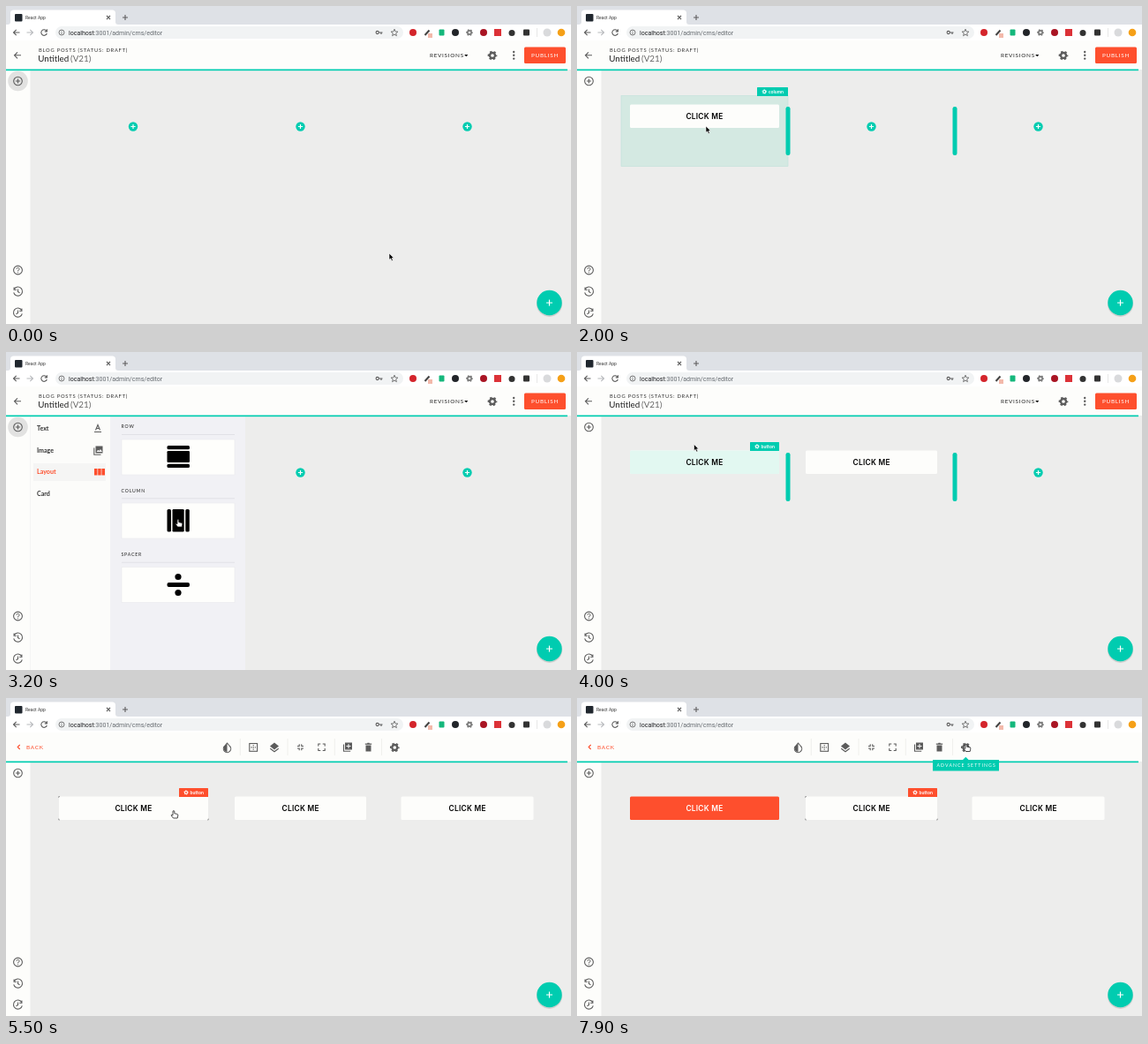
An HTML page for the animation above (8 s loop, 640 by 360 pixels).

```html
<!DOCTYPE html>
<html lang="en">
<head>
<meta charset="utf-8">
<title>Page editor</title>
<style>
  html, body { margin: 0; width: 100%; height: 100%; overflow: hidden; background: #ededec; }
  svg { display: block; width: 100vw; height: 100vh; font-family: Lato, sans-serif; }
  .teal { fill: #00ccb0; }
  .orange { fill: #fe4f2d; }
  .paper { fill: #fdfdfb; }
  .ink { fill: #5c5c5c; }
  .line { fill: none; stroke: #5c5c5c; stroke-width: 1.1; }
  .white { fill: none; stroke: #fff; }
  .zone { fill: none; stroke: #00ccb0; stroke-width: 2.5; stroke-linecap: round; }
  .chrome { font-family: Roboto, sans-serif; }
  .caps { font-size: 6.4px; letter-spacing: .7px; }
  .menu { font-size: 7.1px; font-weight: 700; fill: #333; }
  .head { font-size: 5.2px; letter-spacing: .8px; fill: #222; }
  .tag { font-size: 5.2px; font-weight: 700; fill: #fff; }
  .cta { font: 600 8.4px Inter, sans-serif; letter-spacing: .25px; text-anchor: middle; }
  .label { font-size: 7.7px; fill: #747474; }
  .help { font-size: 6.2px; fill: #858585; }
</style>
</head>
<body>
<svg viewBox="0 0 640 360">
  <defs>
    <g id="gear" fill="none" stroke="currentColor">
      <circle r="3" stroke-width="2.3"/>
      <circle r="4.5" stroke-width="1.7" stroke-dasharray="2.356" stroke-dashoffset="1.2"/>
    </g>
    <g id="add"><circle r="5.2"/><path class="white" d="M-2.6 0H2.6M0-2.6V2.6" stroke-width="1.2"/></g>
    <path id="undo" class="line" d="M-4.2-2.6A5 5 0 1 1-4.8 1.3M-4.4-4.6V-1.8H-1.6M0-2.4V.4L2 1.8"/>
    <g id="tag">
      <rect width="33" height="10" rx=".6"/>
      <use href="#gear" transform="translate(8 5) scale(.5)" color="#fff"/>
      <text class="tag" x="12.5" y="6.9">button</text>
    </g>
    <path id="corners" fill="none" stroke="#666" stroke-width=".6" stroke-dasharray="1 1"/>
  </defs>

  <!-- browser -->
  <g class="chrome">
    <rect width="640" height="22" fill="#dee1e6"/>
    <rect y="21" width="640" height="19" fill="#fff"/>
    <path d="M2 21Q5 21 5 18V8Q5 4.500 9 4.500H120Q124 4.500 124 8V18Q124 21 127 21Z" fill="#fff"/>
    <rect x="10" y="9" width="8.500" height="8.500" rx="1" fill="#20272e"/>
    <text x="22" y="14.800" font-size="5" fill="#333">React App</text>
    <path class="line" d="M114 11L118 15M118 11L114 15M132 13H138M135 10V16" stroke-width=".9"/>
    <path class="line" d="M15.500 30H8.500M11.700 26.800L8.500 30L11.700 33.200"/>
    <path class="line" d="M23.500 30H30.500M27.300 26.800L30.500 30L27.300 33.200" style="stroke:#b8babd"/>
    <path class="line" d="M45.700 28A3.300 3.300 0 1 0 46.300 31M46.400 26.300V28.900H43.800"/>
    <rect x="56" y="23" width="394" height="14" rx="7" fill="#f1f3f4"/>
    <circle class="line" cx="63" cy="30" r="3" stroke-width=".8" style="stroke-width:.8"/>
    <path class="line" d="M63 28.200V28.900M63 29.600V31.800" style="stroke-width:.8"/>
    <text x="71" y="32.600" font-size="7.050" fill="#666b70"><tspan fill="#202124">localhost</tspan>:3001/admin/cms/editor</text>
    <g class="line"><circle cx="420.700" cy="30" r="1.600"/><path d="M422.300 30H426.500M425 30V32"/></g>
    <path class="line" d="M440 26.200L441.100 28.900L443.900 29.100L441.700 30.900L442.400 33.700L440 32.200L437.600 33.700L438.300 30.900L436.100 29.100L438.900 28.900Z" style="stroke-width:.8"/>
    <circle cx="461" cy="30" r="4" fill="#d4252c"/>
    <path d="M474.500 33L479.500 27.500" stroke="#444" stroke-width="2"/><rect x="478" y="31" width="5" height="5" fill="#f3b9ab"/>
    <rect x="490.500" y="26.500" width="6" height="7" rx="1" fill="#15b77c"/>
    <circle cx="509" cy="30" r="4" fill="#22252a"/>
    <use href="#gear" transform="translate(525 30) scale(.72)" color="#777"/>
    <circle cx="541" cy="30" r="4" fill="#a91524"/>
    <rect x="553" y="26" width="8" height="8" fill="#dc3238"/>
    <circle cx="573" cy="30.500" r="3.500" fill="#333"/>
    <rect x="586" y="26.500" width="7" height="7" rx="1" fill="#333"/>
    <path d="M601.500 25V35" stroke="#ddd" stroke-width=".7"/>
    <circle cx="613" cy="30" r="4.500" fill="#d9dadc"/>
    <circle cx="629" cy="30" r="4.300" fill="#f5a018"/>
  </g>

  <!-- canvas -->
  <rect y="72" width="640" height="288" fill="#ededec"/>
  <g data-on="2000-2900">
    <rect x="50" y="101.500" width="189" height="80" fill="#d4e9e2" stroke="#b9e0d8" stroke-width=".5"/>
    <rect class="teal" x="204" y="92" width="35" height="10" rx=".6"/>
    <use href="#gear" transform="translate(212.300 97) scale(.5)" color="#fff"/>
    <text class="tag" x="217" y="98.900">column</text>
  </g>
  <use href="#add" class="teal" x="144" y="136.500" data-on="0-1700"/>
  <use href="#add" class="orange" x="144" y="136.500" data-on="1700-1900"/>
  <use href="#add" class="teal" x="333.500" y="136.500" data-on="0-3500"/>
  <use href="#add" class="orange" x="333.500" y="136.500" data-on="3500-3700"/>
  <use href="#add" class="teal" x="522.500" y="136.500" data-on="0-4900"/>
  <use href="#add" class="orange" x="522.500" y="136.500" data-on="4900-5100"/>

  <g data-on="1900-8000">
    <rect class="paper" x="60" y="111.500" width="169" height="26.500" rx="1.500"/>
    <rect x="60" y="111.500" width="169" height="26.500" rx="1.500" fill="#e2f8f1" data-on="3900-4100,5400-5500"/>
    <text class="cta" x="144.500" y="127.700">CLICK ME</text>
  </g>
  <g data-on="7100-8000">
    <rect class="orange" x="60" y="111.500" width="169" height="26.500" rx="1.500"/>
    <text class="cta" x="144.500" y="127.700" fill="#fff">CLICK ME</text>
  </g>
  <g data-on="3700-8000">
    <rect class="paper" x="259" y="111.500" width="149" height="26.500" rx="1.500"/>
    <rect x="259" y="111.500" width="149" height="26.500" rx="1.500" fill="#e2f8f1" data-on="7700-7800"/>
    <text class="cta" x="333.700" y="127.700">CLICK ME</text>
  </g>
  <g data-on="5100-8000">
    <rect class="paper" x="447.500" y="111.500" width="150" height="26.500" rx="1.500"/>
    <text class="cta" x="522.700" y="127.700">CLICK ME</text>
  </g>
  <use href="#tag" class="teal" x="196" y="102" data-on="3900-4100,5400-5500"/>
  <use href="#tag" class="teal" x="375" y="102" data-on="7700-7800"/>
  <g data-on="5500-7800">
    <use href="#tag" class="orange" x="196" y="102"/>
    <path class="line" d="M59.700 113V111.500H61M59.700 136.500V138H61M228 138H229.300V136.500" style="stroke-width:.5"/>
  </g>
  <g data-on="7800-8000">
    <use href="#tag" class="orange" x="375" y="102"/>
    <path class="line" d="M258.700 113V111.500H260M258.700 136.500V138H260M407 138H408.300V136.500" style="stroke-width:.5"/>
  </g>
  <g class="teal" data-on="1900-3000,3700-4200,5100-5500">
    <rect x="236.500" y="114" width="5" height="55" rx="2.200"/>
    <rect x="425.500" y="114" width="5" height="55" rx="2.200"/>
  </g>

  <!-- drop zones -->
  <path class="zone" data-on="1500-1900,3300-3700,4600-5100" d="M48.800 103V180M238.200 103V180M427 103V180M618 103V180M61 113H223M250 113H412M439 113H601M439 180.300H601"/>
  <path class="zone" data-on="1500-1900" d="M61 180.300H223M250 180.300H412"/>
  <path class="zone" data-on="3300-3700" d="M61 146.800H223M250 180.300H412"/>
  <path class="zone" data-on="4600-5100" d="M61 146.800H223M260 146.800H402M250 156.700H412"/>

  <!-- element menu -->
  <g data-on="900-1500,3000-3300,4300-4600">
    <rect x="28" y="73" width="90" height="287" fill="#fcfcfa"/>
    <rect x="118" y="73" width="153" height="287" fill="#f1f1f5"/>
    <rect x="31" y="126" width="82" height="20" fill="#f5f5f4"/>
    <g class="menu">
      <text x="35" y="89.300">Text</text><text x="35" y="113.800">Image</text>
      <text class="orange" x="35" y="138.300">Layout</text><text x="35" y="162.500">Card</text>
    </g>
    <path class="line" d="M101.500 88.500L104 82.500L106.500 88.500M102.500 86.500H105.500M100 90.500H108"/>
    <path class="ink" d="M101.500 106.500H109.500V114.500H101.500Z"/><path class="line" d="M99.800 108.500V116.200H107.500"/>
    <path d="M102.500 113L104.300 110.700L105.500 112L107 110L109 113Z" fill="#fff"/>
    <path class="orange" d="M100 132H103.500V139.500H100ZM104.200 132H107.700V139.500H104.200ZM108.400 132H112V139.500H108.400Z"/>
    <g class="head"><text x="130.500" y="86.300">ROW</text><text x="130.500" y="158.600">COLUMN</text><text x="130.500" y="231">SPACER</text></g>
    <path d="M131 93.500H259M131 165.800H259M131 238.200H259" stroke="#dedee2" stroke-width=".8"/>
    <path d="M131 99H259V139H131ZM131 171H259V211H131ZM131 243.500H259V283.500H131Z" fill="#fefefc" stroke="#e6e6e9" stroke-width=".5"/>
    <g>
      <rect x="182.500" y="106" width="25.500" height="4.300" rx="1.500"/><rect x="182.500" y="112" width="25.500" height="13" rx="1.200"/><rect x="182.500" y="126.700" width="25.500" height="4.300" rx="1.500"/>
      <rect x="182.500" y="178" width="4.500" height="25.500" rx="1.500"/><rect x="188.500" y="178" width="13.200" height="25.500" rx="1.200"/><rect x="203.300" y="178" width="4.500" height="25.500" rx="1.500"/>
      <rect x="182.500" y="261" width="25.500" height="5" rx="2"/><circle cx="195" cy="254.500" r="3.600"/><circle cx="195" cy="272.500" r="3.600"/>
    </g>
  </g>

  <!-- sidebar -->
  <rect class="paper" y="72" width="27.500" height="288"/>
  <circle cx="13.500" cy="85" r="11.300" fill="#e2e2e1" data-on="0-1500,2900-3300,4200-4600"/>
  <circle class="line" cx="13.500" cy="85" r="4.800"/><path class="line" d="M11 85H16M13.500 82.500V87.500"/>
  <circle class="line" cx="13.500" cy="299" r="4.900"/><path class="line" d="M11.900 297.800A1.600 1.600 0 1 1 13.500 299.400V300.300M13.500 301.200V302.200" style="stroke-width:.9"/>
  <use href="#undo" x="13.500" y="323"/>
  <use href="#undo" transform="translate(13.500 347) scale(-1 1)"/>

  <!-- header -->
  <rect class="paper" y="39" width="640" height="33"/>
  <rect class="teal" y="71.500" width="636" height="1.700"/>
  <g data-on="0-5500">
    <path class="line" d="M17 55.800H9.500M13 52.300L9.500 55.800L13 59.300"/>
    <text x="37" y="51.800" font-size="5.800" letter-spacing=".76" fill="#333">BLOG POSTS (STATUS: DRAFT)</text>
    <text x="36.300" y="63.300" font-size="9.800" fill="#222">Untitled <tspan x="73" fill="#666">(V21)</tspan></text>
    <text class="caps" x="480" y="58" fill="#222">REVISIONS</text><path d="M519.200 55H523.400L521.300 57.200Z"/>
    <use href="#gear" x="551" y="56" color="#5c5c5c"/>
    <g class="ink"><circle cx="575.200" cy="52" r="1.200"/><circle cx="575.200" cy="55.800" r="1.200"/><circle cx="575.200" cy="59.600" r="1.200"/></g>
    <rect class="orange" x="587" y="46.500" width="47" height="18.500" rx="1.500"/>
    <text class="caps" x="595" y="58" fill="#fff">PUBLISH</text>
  </g>
  <g data-on="5500-8000">
    <path class="line" d="M15.700 53L13.200 55.500L15.700 58" style="stroke:#fe4f2d"/>
    <text class="caps orange" x="23" y="57.800" font-size="6.200">BACK</text>
    <path d="M265.300 46V65M319 46V65M372.300 46V65M425.500 46V65" stroke="#ececea" stroke-width=".8"/>
    <path class="line" d="M250.500 51L253.500 54.500A4.200 4.200 0 1 1 247.500 54.500Z"/><path class="ink" d="M250.500 51V61A4 4 0 0 1 247 55Z"/>
    <rect class="line" x="275.800" y="51.500" width="8.800" height="8.800"/><path class="line" d="M277.500 55.900H283M280.200 53V59" stroke-dasharray="1.300 .9"/>
    <path class="ink" d="M304 50.500L309 54.500L304 58.500L299 54.500Z"/><path class="line" d="M299.300 57.200L304 60.800L308.700 57.200"/>
    <path class="line" d="M330 54.500H332.200V52.300M337 54.500H334.800V52.300M330 57H332.200V59.200M337 57H334.800V59.200"/>
    <path class="line" d="M353.800 54.500V52H356.300M358.700 52H361.200V54.500M353.800 57V59.500H356.300M358.700 59.500H361.200V57"/>
    <path class="ink" d="M384 50.500H392V58.500H384Z"/><path class="line" d="M382.500 52.500V60.200H390.200"/><path class="white" d="M385.500 54.500H390.500M388 52V57"/>
    <path class="ink" d="M407.500 53.500H413.500V60.500H407.500ZM406.800 51.500H409L409.500 50.800H411.500L412 51.500H414.200V52.700H406.800Z"/>
    <circle cx="440.300" cy="56" r="11.500" fill="#e6e6e5" data-on="5800-7500"/>
    <use href="#gear" x="440.300" y="56" color="#5c5c5c"/>
  </g>
  <g data-on="5800-5900,7900-8000">
    <path class="teal" d="M403 70H437L440.300 66.800L443.600 70H478V82.500H403Z"/>
    <text x="407.500" y="78.300" font-size="5.200" letter-spacing="1.100" fill="#fff">ADVANCE SETTINGS</text>
  </g>

  <circle cx="615.500" cy="337.300" r="14.600" opacity=".12"/>
  <circle class="teal" cx="615.500" cy="336" r="14.200"/>
  <path class="white" d="M612 336H619M615.500 332.500V339.500" stroke-width="1.200"/>

  <!-- settings drawer -->
  <g data-on="5900-7500">
    <rect x="458.500" y="41" width="3" height="319" opacity=".08"/>
    <rect x="460" y="41" width="180" height="319" fill="#fcfcfa"/>
    <g fill="#000" opacity=".04"><rect x="460" y="72" width="180" height="2"/><rect x="460" y="72" width="180" height="4"/></g>
    <text x="474.800" y="58.600" font-size="8.300" font-weight="700" fill="#333">Advanced settings</text>
    <path class="line" d="M621.700 51.700L628.300 58.300M628.300 51.700L621.700 58.300"/>
    <path d="M482 121V95.500Q482 94 483.500 94H616Q617.500 94 617.500 95.500V121ZM482 322V296.500Q482 295 483.500 295H616Q617.500 295 617.500 296.500V322Z" fill="#f2f2f1"/>
    <path d="M482 121.300H617.500M482 322.300H617.500M482 260.800H617.500" stroke="#909090" stroke-width=".8"/>
    <rect class="line" x="482" y="155.700" width="135.500" height="53.500" rx="1" style="stroke-width:.9"/>
    <g class="label"><text x="488" y="109.800">CSS class</text><text x="490.500" y="179">Inline CSS</text></g>
    <g class="label" style="fill:#222"><text x="482" y="253.500" data-on="0-7100">Default</text><text x="482" y="253.500" data-on="7100-8000">Primary</text></g>
    <path class="ink" d="M608.500 252.300H613.700L611.100 255Z"/>
    <g class="help">
      <text x="482" y="129.600">Custom CSS class names</text><text x="482" y="217.600">Edit inline CSS styles</text>
      <text x="482" y="269.300">Button type</text><text x="482" y="331">On click, go to this URL.</text>
    </g>
    <path d="M490.500 357.500H498L500.500 360H490.500Z" fill="#999"/>
  </g>

  <!-- pointer -->
  <g id="pointer">
    <circle class="orange" cx="-3.200" cy=".5" r="7.500" data-on="1500-1900,3300-3700,4600-5100"/>
    <path data-on="0-900,1500-3000,3300-4200,4600-5500,7500-7800" stroke="#fff" stroke-width=".6" d="M0 0V7.300L1.700 5.800L2.900 8.600L4.300 8L3.100 5.300H5.300Z"/>
    <path data-on="900-1500,3000-3300,4200-4600,5500-7500,7800-8000" fill="#fff" stroke="#222" stroke-width=".8" d="M-1 0Q0-.8 .8 0V2.700L4 3.400Q5 3.700 4.800 5L4.200 8H-.5L-3 4.800Q-2.500 3.600-1 4.800Z"/>
  </g>
</svg>
<script>
  const LOOP = 8000, STEP = 100;
  // pointer stops: time, x, y
  const path = [
    [400, 434, 280], [500, 420, 280], [700, 120, 130], [900, 14, 84], [1100, 109, 131],
    [1300, 190, 190], [1400, 195, 190], [1800, 146, 136], [2400, 146, 136], [2800, 46, 87.500],
    [2900, 20, 85], [3000, 20, 85], [3200, 195, 190], [3600, 333, 136], [3700, 333, 136],
    [4000, 132.500, 104.500], [4200, 14, 84], [4500, 195, 190], [4900, 498.500, 134.500],
    [5000, 520, 136], [5200, 450, 222], [5400, 190, 128], [5500, 190, 128], [5800, 440.500, 52],
    [5900, 440.500, 52], [6400, 541.500, 261.500], [7100, 541.500, 261.500], [7400, 625, 53],
    [7500, 610, 60], [7700, 340, 136], [7800, 345, 130], [7900, 441, 52.500]
  ];
  const pointer = document.getElementById('pointer');
  const timed = [...document.querySelectorAll('[data-on]')].map(el => ({
    el, spans: el.dataset.on.split(',').map(span => span.split('-').map(Number))
  }));

  function pointerAt(t) {
    const next = path.findIndex(stop => stop[0] >= t);
    if (next < 0) return path[path.length - 1].slice(1);
    if (next === 0) return path[0].slice(1);
    const [t0, x0, y0] = path[next - 1], [t1, x1, y1] = path[next];
    const k = (t - t0) / (t1 - t0);
    return [x0 + (x1 - x0) * k, y0 + (y1 - y0) * k];
  }

  function draw() {
    const t = Math.floor(performance.now() % LOOP / STEP) * STEP;
    for (const { el, spans } of timed)
      el.style.display = spans.some(([from, to]) => t >= from && t < to) ? '' : 'none';
    pointer.setAttribute('transform', `translate(${pointerAt(t)})`);
    requestAnimationFrame(draw);
  }
  draw();
</script>
</body>
</html>
```
